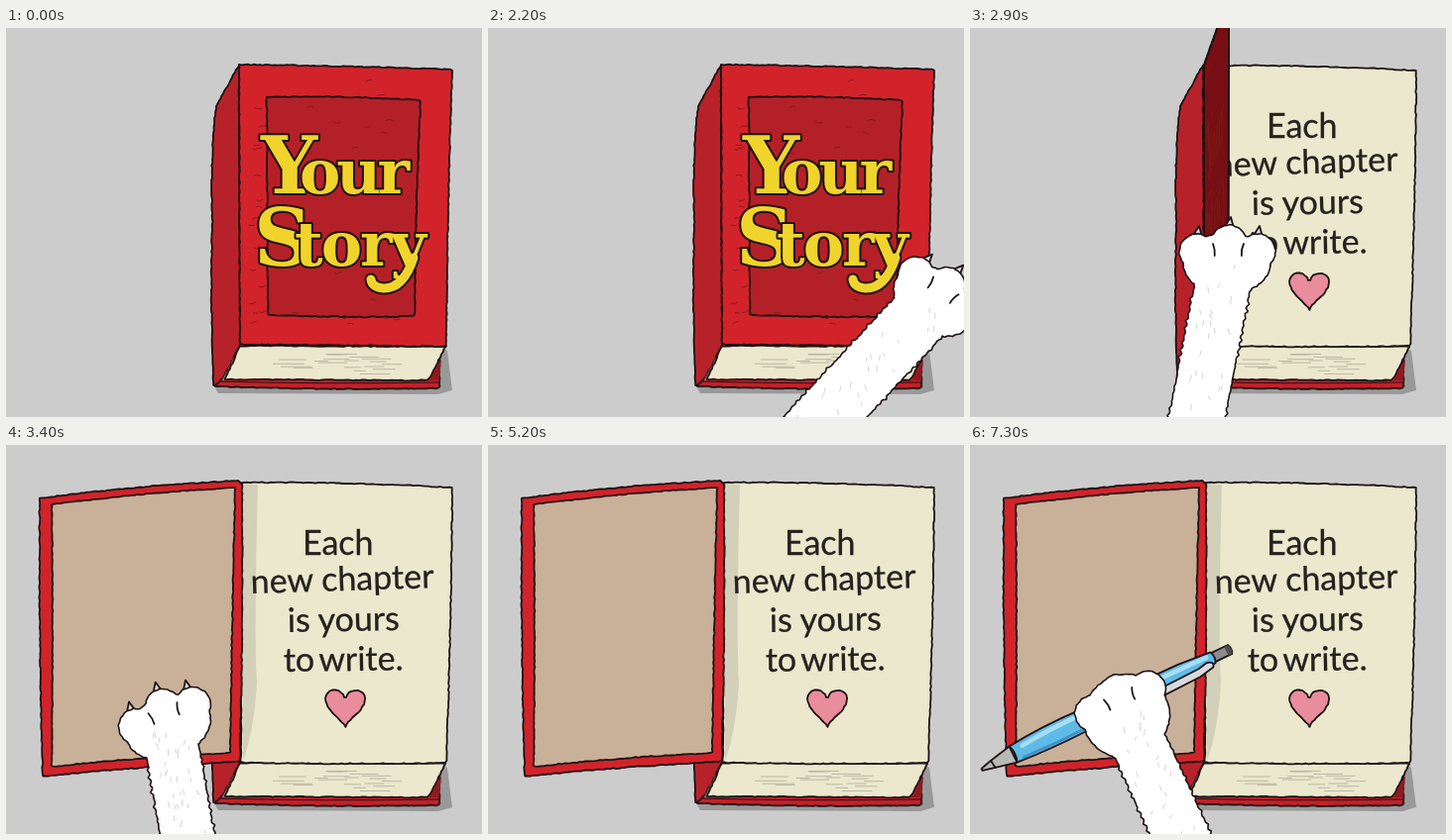
These frames come from a looping animation (480x393 px, 8000 ms). An HTML page:

```html
<!DOCTYPE html>
<html lang="en">
<head>
<meta charset="utf-8">
<title>Your Story</title>
<style>
  html, body { margin: 0; width: 100%; height: 100%; overflow: hidden; background: #ccc; }
  svg { display: block; width: 480px; height: 393px; }
  path { stroke-linejoin: round; stroke-linecap: round; }
  .ink { stroke: #1d1214; stroke-width: 1.8; vector-effect: non-scaling-stroke; }
  .none { fill: none; }
  .title text { font-family: "DejaVu Serif", "Noto Serif", serif; font-weight: bold; font-size: 62px;
    fill: #f0d42c; stroke: #1d1214; stroke-width: 4; paint-order: stroke; stroke-linejoin: round; }
  .title .cap { font-size: 80px; }
  .page text { font-family: Lato, "Open Sans", sans-serif; font-size: 34px; fill: #25211f; stroke: #25211f; stroke-width: .3; }
</style>
</head>
<body>
<svg viewBox="0 0 480 393">
  <g id="base" class="book">
    <path fill="#999" d="M440 323L445 326L450 366L436 370L214 369L210 362Z"/>
    <path class="ink" fill="#c42028" d="M212 340L209 362Q320 366 437 364L437 335Z"/>
    <path class="none" stroke="#1d1214" d="M214 357Q320 360 436 358"/>
    <path class="ink" fill="#b7222a" d="M235 37L212 79Q206 125 208 190Q206 280 209 362L219 354L236 321Z"/>
    <path fill="#8f8a7c" d="M236 321L218 356L234 356Z"/>
    <path class="ink" fill="#ebe8cd" d="M236 321L443 322L426 356L221 355Z"/>
    <path fill="#8e1a20" d="M439 334L427 356L437 356Z"/>
    <g id="leaves" stroke="#bab8a6"></g>
  </g>

  <g id="page" class="book page">
    <path class="ink" fill="#ebe8cd" d="M237 38Q340 37 450 43Q449 180 444 321Q340 323 237 321Z"/>
    <path fill="#d3d0b9" d="M238 39L254 40Q250 190 253 240Q250 290 239 319Z"/>
    <path class="ink" fill="#e98c9c" d="M342 285C336 273 322 268 322 256C324 245 337 244 342 256C347 244 362 245 362 257C361 269 348 274 342 285Z"/>
    <text x="299" y="111">Each</text>
    <text x="247" y="150" transform="rotate(-1.8 247 150)">new chapter</text>
    <text x="284" y="189" transform="rotate(-1 284 189)">is yours</text>
    <text x="280" y="229" transform="rotate(-.8 280 229)" word-spacing="-4">to write.</text>
  </g>

  <g id="front" class="book">
    <path class="ink" fill="#d2232a" d="M235 37Q340 38 450 42Q445 180 444 322Q340 320 236 320Z"/>
    <path class="ink" fill="#b42027" d="M263 70Q340 68 418 73Q413 180 412 291Q340 293 264 290Z"/>
    <g id="grain" class="none" stroke="#8c171d"></g>
    <g class="title">
      <path class="none" stroke="#1d1214" stroke-width="13" d="M411 232Q401 263 381 263Q369 262 368 254"/>
      <text y="167" letter-spacing="-4"><tspan class="cap" x="257">Y</tspan><tspan x="296">our</tspan></text>
      <text y="240" letter-spacing="-2"><tspan class="cap" x="250">S</tspan><tspan x="291">tory</tspan></text>
      <path class="none" stroke="#f0d42c" stroke-width="9" d="M411 232Q401 263 381 263Q369 262 368 254"/>
    </g>
    <path id="shade" class="ink" fill="#760f14" d="M236 38L449 43L443 320L237 319Z"/>
  </g>

  <g id="flap" class="book">
    <path class="ink" fill="#d2232a" d="M34 54Q130 41 235 36L238 40Q239 180 236 320Q130 325 37 335Q33 190 34 54Z"/>
    <path class="ink" fill="#c8b099" d="M46 60Q140 48 231 43Q228 180 226 311Q140 315 46 325Q48 190 46 60Z"/>
  </g>

  <g id="reach"></g>
  <g id="grip"></g>
  <g id="pull"></g>

  <g id="pen">
    <g transform="translate(263 206) rotate(-25.9)">
      <path class="ink" fill="#8b8b8d" d="M-22 -5L-1 -5Q2 0 -1 5L-22 5Z"/>
      <path fill="#4d4d50" d="M-5 -5L-1 -5Q2 0 -1 5L-5 5Z"/>
      <path class="ink" fill="#b9b9b9" d="M-244 -9L-268 -4L-279 -1L-279 1L-267 4L-244 9Z"/>
      <path class="none ink" d="M-267 -4L-266 4"/>
      <path class="ink" fill="#5fbbe6" d="M-244 -9Q-205 -13 -165 -11L-55 -9L-20 -6Q-17 0 -20 6L-70 10L-165 11Q-205 12 -244 9Q-240 0 -244 -9Z"/>
      <path class="none" stroke="#a6def4" stroke-width="4.5" d="M-232 -4Q-200 -7 -165 -6L-26 -3"/>
      <path class="none" stroke="#3b93c4" stroke-width="2.5" d="M-236 7Q-200 9 -165 8L-80 8"/>
      <path class="ink" fill="#d9dadb" d="M-88 5L-38 4L-28 2Q-20 4 -24 9L-40 12L-88 13Z"/>
    </g>
  </g>
  <g id="fist"></g>
</svg>
<script>
const NS = 'http://www.w3.org/2000/svg';
const $ = id => document.getElementById(id);

let seed = 7;
const rand = (a = 0, b = 1) => {
  seed = (seed * 16807) % 2147483647;
  return a + (b - a) * seed / 2147483647;
};

function draw(parent, d, attrs = {}) {
  const el = document.createElementNS(NS, 'path');
  el.setAttribute('d', d);
  for (const k in attrs) el.setAttribute(k, attrs[k]);
  parent.append(el);
  return el;
}

// Redraw a closed outline with a shaky hand; push(i) is the outward offset of sample i
function roughen(el, step, push) {
  const len = el.getTotalLength(), pts = [];
  for (let s = 0, i = 0; s < len; s += step, i++) {
    const a = el.getPointAtLength(s), b = el.getPointAtLength(s + .5), k = 2 * push(i);
    pts.push(`${(a.x + (b.y - a.y) * k).toFixed(1)} ${(a.y - (b.x - a.x) * k).toFixed(1)}`);
  }
  el.setAttribute('d', `M${pts.join('L')}Z`);
}

const ellipse = (x, y, rx, ry) =>
  `M${x - rx} ${y}A${rx} ${ry} 0 0 1 ${x + rx} ${y}A${rx} ${ry} 0 0 1 ${x - rx} ${y}Z`;

// Three toes and a palm, tilted about (x, y), on a furry arm that runs through (ex, ey)
function paw(id, { x, y, tilt, ex, ey, half = 27, palm = 30, claws = true }) {
  const g = $(id), turn = `rotate(${tilt} ${x} ${y})`, r = 17;
  const toes = [-30, 2, 31].map(u => [x + u, y - (Math.abs(u) < 9 ? 9 : 0)]);

  if (claws) for (const [u, v] of toes) {
    draw(g, `M${u - 5} ${v - r + 2}L${u + 2} ${v - r - 9}L${u + 5} ${v - r + 2}Z`,
      { class: 'ink', fill: '#dcdcdc', transform: turn });
  }

  const px = x - palm * .4 * Math.sin(tilt * Math.PI / 180);
  const py = y + palm * .4 * Math.cos(tilt * Math.PI / 180);
  const dx = ex - px, dy = ey - py, len = Math.hypot(dx, dy);
  const nx = -dy / len * half, ny = dx / len * half, fx = ex + dx, fy = ey + dy;

  const black = { fill: '#fff', stroke: '#1d1214', 'stroke-width': 3.2 };
  const shapes = [
    draw(g, `M${px + nx} ${py + ny}L${px - nx} ${py - ny}L${fx - nx} ${fy - ny}L${fx + nx} ${fy + ny}Z`, black),
    draw(g, ellipse(x, y + palm * .4, 43, palm), { ...black, transform: turn }),
    ...toes.map(([u, v]) => draw(g, ellipse(u, v, r, r), { ...black, transform: turn })),
  ];
  shapes.forEach((s, n) => roughen(s, 2.5, i => i % 3 ? rand(-.4, .4) : rand(0, n ? .8 : 2.2)));

  // Fill again without the line so that only the joint silhouette keeps it
  for (const s of shapes) {
    const top = s.cloneNode();
    top.setAttribute('stroke', 'none');
    g.append(top);
  }

  for (let i = 0; i < 45; i++) {
    const a = rand(0, 1.9), b = rand(-.75, .75);
    draw(g, `M${px + dx * a + nx * b} ${py + dy * a + ny * b}l${rand(-2, 2)} ${rand(3, 6)}`,
      { stroke: '#d3d6dc' });
  }
  for (const u of [-14, 17]) {
    draw(g, `M${x + u} ${y - 8}q${-u / 6} 6 ${-u / 8} 12`, { class: 'none ink', transform: turn });
  }
}

for (const el of document.querySelectorAll('.book .ink')) roughen(el, 3, () => rand(-.5, .5));

paw('reach', { x: 456, y: 266, tilt: 35, ex: 340, ey: 393, half: 30 });
paw('grip', { x: 259, y: 226, tilt: 0, ex: 229, ey: 393 });
paw('pull', { x: 174, y: 309, tilt: -21, ex: 191, ey: 393, half: 26 });
paw('fist', { x: 151, y: 259, tilt: -24, ex: 212, ey: 393, palm: 41, claws: false });

for (let i = 0; i < 36; i++) {
  const x = i % 2 ? rand(244, 256) : rand(270, 405);
  draw($('grain'), `M${x} ${rand(48, 312)}q2 ${rand(-3, 3)} ${rand(4, 7)} ${rand(-2, 2)}`);
}
for (let i = 0; i < 20; i++) {
  draw($('leaves'), `M${rand(245, 385)} ${rand(327, 350)}h${rand(10, 32)}`);
}

const show = (id, on) => { $(id).style.display = on ? '' : 'none'; };
const move = (id, x, y, extra = '') => $(id).setAttribute('transform', `translate(${x} ${y}) ${extra}`);
// Whole 200 ms steps from t0 to t
const steps = (t, t0) => Math.floor((t - t0) / 200);

// The cover swings about its hinge: its width shrinks while the free edge lifts
function swing(width, lift, dark) {
  $('front').setAttribute('transform', `translate(236 0) matrix(${width} ${-lift} 0 1 0 0) translate(-236 0)`);
  $('shade').setAttribute('opacity', dark);
}

function render(t) {
  show('page', t >= 2400);
  show('front', t < 3400);
  show('flap', t >= 3400);
  show('reach', t >= 1200 && t < 2400);
  show('grip', t >= 2400 && t < 3400);
  show('pull', t >= 3400 && t < 5200);
  show('pen', t >= 6100);
  show('fist', t >= 6100);

  if (t < 2400) swing(1, 0, 0);
  else if (t < 2900) swing(.57, .29, .4);
  else swing(.118, .35, .96);

  const r = steps(t, 2200);
  move('reach', 25.4 * r, -28 * r);

  move('grip', t < 2900 ? 97 : 0, 0);

  const p = Math.max(-1, steps(t, 4400));
  move('pull', 14.5 * p, 35.3 * p);

  const w = Math.max(0, -steps(t, 7300));
  move('pen', 17.6 * w, 28.7 * w, `rotate(${1.1 * w} 263 206)`);
  move('fist', 21.2 * w, 26.8 * w);
}

function frame() {
  render(performance.now() % 8000);
  requestAnimationFrame(frame);
}
frame();
</script>
</body>
</html>
```
